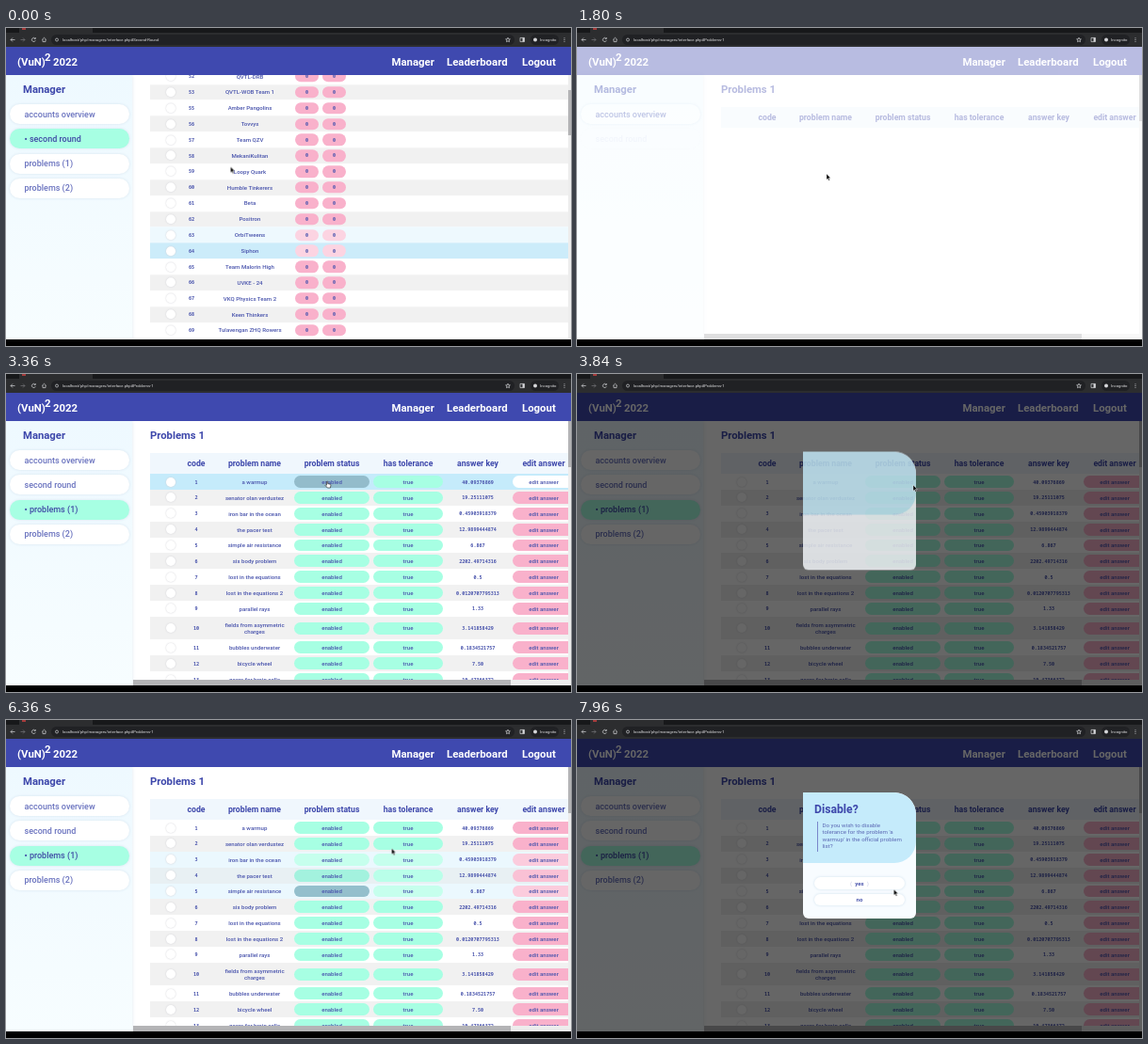
Write an HTML page that moves like this. It is 600 px wide and 338 px high and loops after 8 s.

```html
<!DOCTYPE html>
<html lang="en">
<head>
<meta charset="utf-8">
<title>Contest manager</title>
<style>
  :root { --ink: #3d47ab; --mint: #a7ffe3; --pink: #f9b1cb; --sky: #c5ebfb; }
  html, body { margin: 0; width: 100%; height: 100%; overflow: hidden; background: #000; }
  #stage { position: absolute; left: 0; top: 0; width: 600px; height: 338px; overflow: hidden;
    background: #000; font: 500 6.1px Roboto, sans-serif; color: #4a55ad; }
  #stage div { position: absolute; box-sizing: border-box; white-space: pre; }
  .text { display: flex; align-items: center; }
  .mid { display: flex; align-items: center; justify-content: center; text-align: center; line-height: 1.2; }
  .view { overflow: hidden; }
  .white { background: #fff; }
  .tab { background: #17181a; }
  .bar { background: #2c2d2f; }
  .address { background: #202124; border-radius: 6px; }
  .url { font-size: 4.2px; font-weight: 400; color: #e4e4e6; }
  .nav { background: #3f49af; }
  .link { font-size: 11.4px; font-weight: 700; color: #fff; }
  .title { font-size: 11.3px; font-weight: 700; color: var(--ink); }
  .side { background: linear-gradient(#eef9ff, #f7fdff); box-shadow: 0 0 4px #dfe8f0; }
  .item { border-radius: 11px; background: #fff; box-shadow: 0 0 3px #d5e3ee; padding-left: 15.5px;
    font-size: 9px; color: #6a73bf; }
  .item.on { background: var(--mint); color: #3f4aa5; }
  .head { background: #f0f7fd; }
  .label { font-size: 8.7px; font-weight: 700; color: var(--ink); }
  .num { font: 600 5.1px "Noto Sans Mono", monospace; }
  .pill { border-radius: 7px; }
  .dot { border-radius: 50%; background: #fff; box-shadow: 0 0 2px #cfcfd4; }
  .track { background: #ededed; }
  .thumb { background: #b4b4b6; }
  .dim { background: rgba(0, 0, 0, .6); }
  .modal { background: #f8fcff; border-radius: 1px 23px 6px 6px; overflow: hidden; }
  .top { background: var(--sky); border-radius: 0 23px 23px 0; }
  .ask { font-size: 12.2px; font-weight: 700; color: var(--ink); }
  .body { font-size: 6.2px; font-weight: 400; line-height: 7.3px; color: #5b68b4;
    border-left: 1px solid #7a86cb; padding: 1px 0 0 4.5px; }
  .button { border-radius: 7px; background: #fff; box-shadow: 0 0 3px #cfe0ec; font-weight: 700; }
  .parens { display: flex; align-items: center; justify-content: space-between; font-weight: 700; }
  svg { position: absolute; left: 0; top: 0; overflow: visible; }
</style>
</head>
<body>
<div id="stage"></div>
<script>
const LOOP = 8000;
const stage = document.getElementById('stage');
let css = '', count = 0;

function box(parent, cls, x, y, w, h, text = '') {
  const el = document.createElement('div');
  el.className = cls;
  el.style.cssText = `left:${x}px;top:${y}px;width:${w}px;height:${h}px`;
  el.textContent = text;
  parent.append(el);
  return el;
}
const centred = (parent, cls, x, h, text) => box(parent, 'mid ' + cls, x - 50, 0, 100, h, text);

// Stops are [milliseconds, declarations].
function animate(el, stops, ease = 'linear') {
  const id = 'k' + count++;
  const all = [[0, stops[0][1]], ...stops, [LOOP, stops.at(-1)[1]]];
  css += `@keyframes ${id}{${all.map(([t, s]) => `${t / LOOP * 100}%{${s}}`).join('')}}\n`;
  const rule = `${id} ${LOOP}ms ${ease} infinite`;
  el.style.animation = el.style.animation ? `${el.style.animation}, ${rule}` : rule;
}

function fadeIn(el, on, dur, off, offDur) {
  const stops = [[on, 'opacity:0'], [on + dur, 'opacity:1']];
  if (off) stops.push([off, 'opacity:1'], [off + offDur, 'opacity:0']);
  animate(el, stops);
}

// Spans are [on, off, strength].
function glow(el, base, hot, spans) {
  const stops = [];
  for (const [on, off, k = 1] of spans) {
    const lit = `background-color:color-mix(in srgb, ${hot} ${k * 100}%, ${base})`;
    const rest = `background-color:${base}`;
    stops.push([on, rest], [Math.min(on + 150, off), lit], [off, lit], [off + 250, rest]);
  }
  animate(el, stops);
}

function show(el, spans, first = 0) {
  const stops = [[0, `opacity:${first}`]];
  for (const [on, off] of spans)
    stops.push([on, `opacity:${1 - first}`], [off, `opacity:${first}`]);
  animate(el, stops, 'step-end');
}

function drawing(parent, markup) {
  parent.insertAdjacentHTML('beforeend', `<svg width="1" height="1">${markup}</svg>`);
  return parent.lastElementChild;
}

function browserBar() {
  box(stage, 'tab', 0, 0, 600, 5);
  box(stage, 'bar', 14, 0, 78, 5);
  box(stage, '', 17, 0, 4, 1.5).style.background = '#a33b3b';
  box(stage, 'bar', 0, 4.5, 600, 15.5);
  box(stage, 'address', 48, 7, 492, 11);
  const url = 'localhost/php/managers/interface.php#';
  show(box(stage, 'text url', 60, 7, 200, 11, url + 'Second-Round'), [[600, LOOP]], 1);
  show(box(stage, 'text url', 60, 7, 200, 11, url + 'Problems-1'), [[600, LOOP]]);
  box(stage, 'address', 557, 7, 30, 11);
  box(stage, 'text url', 567, 7, 20, 11, 'Incognito');
  drawing(stage, `<g fill="none" stroke="#d6d7da" stroke-width=".7">
    <path d="M9.5 12.5H5M7 10.5l-2 2 2 2"/><path stroke="#77787b" d="M15.5 12.5H20M18 10.5l2 2-2 2"/>
    <path d="M31 11.3a2 2 0 1 0 .3 1.8M31.3 10v1.5h-1.5"/><path d="M38.3 12.3l2.2-2 2.2 2M39 12v2.6h3V12"/>
    <circle cx="54" cy="12.5" r="1.5"/>
    <path d="M533 10.2l.7 1.6 1.7.1-1.3 1.1.4 1.7-1.5-.9-1.5.9.4-1.7-1.3-1.1 1.7-.1z"/>
    <path d="M546 10.4h4.4v4.2H546z"/></g>
    <path fill="#d6d7da" d="M548.5 10.4h2v4.2h-2z"/><circle cx="562" cy="12.5" r="2" fill="#d6d7da"/>
    <g fill="#d6d7da"><circle cx="593" cy="10.7" r=".5"/><circle cx="593" cy="12.5" r=".5"/><circle cx="593" cy="14.3" r=".5"/></g>`);
}

// Returns the parts so that a page can bring them in one after another.
function frame(page, active) {
  const side = box(page, 'side', 0, 50, 134, 281);
  const nav = box(page, 'nav', 0, 20, 600, 30);
  box(nav, 'text link', 12, 0, 40, 31, '(VuN)');
  box(nav, 'text link', 41, 0, 10, 22, '2');
  box(nav, 'text link', 50, 0, 40, 31, '2022');
  [['Manager', 409.5], ['Leaderboard', 468], ['Logout', 548]]
    .forEach(([s, x]) => box(nav, 'text link', x, 0, 70, 31, s));
  const title = box(page, 'text title', 18, 57, 100, 16, 'Manager');
  const items = ['accounts overview', 'second round', 'problems (1)', 'problems (2)'].map((s, i) =>
    box(page, 'text item' + (i === active ? ' on' : ''), 4, 81 + 26.3 * i, 127, 21,
      i === active ? '• ' + s : s));
  return { parts: [side, nav, title], items };
}

function roundPage() {
  const page = box(stage, 'view white', 0, 0, 600, 331);
  page.style.clipPath = 'inset(20px 0 0 0)';
  animate(page, [[640, 'opacity:1'], [720, 'opacity:0']]);
  const view = box(page, 'view', 135, 50, 462, 281);
  const list = box(view, '', 18, 0, 444, 400);
  animate(list, [[0, 'transform:none'], [280, 'transform:translateY(48px)']], 'ease-out');
  const names = ['Quanta', 'Team Vector', 'Pendulum', 'Torque', 'Fulcrum', 'QVTL-DRB', 'QVTL-WOB Team 1',
    'Amber Pangolins', 'Tovvys', 'Team QZV', 'MekaniKulitan', 'Loopy Quark', 'Humble Tinkerers', 'Beta',
    'Positron', 'OrbiTweens', 'Siphon', 'Team Malorin High', 'UVKE - 24', 'VKQ Physics Team 2',
    'Keen Thinkers', 'Tulavengan ZHQ Rowers', 'Lumen'];
  const pitch = 16.87;
  names.forEach((name, i) => {
    const code = 47 + i + (i > 6);
    const base = i % 2 ? '#ffffff' : '#f1f1f1';
    const heat = { 63: .3, 64: .85 }[code];
    const row = box(list, '', 0, 9.6 + pitch * (i - 6), 444, pitch);
    row.style.background = base;
    box(row, 'dot', 16.5, 3.4, 10, 10);
    centred(row, 'num', 44, pitch, code);
    centred(row, '', 106, pitch, name);
    const pills = [154, 183].map(x => box(row, 'mid pill num', x, 2.2, 25, 12.4, '0'));
    pills.forEach(p => p.style.background = 'var(--pink)');
    if (!heat) return;
    const cool = (el, hot, from, k) => animate(el, [
      [0, `background-color:color-mix(in srgb, ${hot} ${k * 100}%, ${from})`],
      [240, `background-color:${from}`], [LOOP - 1, `background-color:${from}`]]);
    cool(row, 'var(--sky)', base, heat);
    pills.forEach(p => cool(p, 'white', 'var(--pink)', .45));
  });
  box(page, 'track', 597, 50, 3, 281);
  const thumb = box(page, 'thumb', 597, 66, 3, 48);
  animate(thumb, [[0, 'transform:none'], [280, 'transform:translateY(-4px)']], 'ease-out');
  frame(page, 1);
}

function problemsPage() {
  const page = box(stage, 'view', 0, 0, 600, 331);
  const { parts, items } = frame(page, 2);
  const start = 1720;
  const view = box(page, 'view', 135, 50, 462, 281);
  const title = box(view, 'text title', 18, 7, 100, 16, 'Problems 1');
  const head = box(view, 'head', 18, 34, 444, 22);
  [['code', 49], ['problem name', 111], ['problem status', 193], ['has tolerance', 274],
    ['answer key', 348], ['edit answer', 418]].forEach(([s, x]) => centred(head, 'label', x, 22.5, s));

  const problems = [['a warmup', '40.09376869'], ['senator olan verdustez', '19.25111075'],
    ['iron bar in the ocean', '0.45903918379'], ['the pacer test', '12.9899444874'],
    ['simple air resistance', '6.867'], ['six body problem', '2202.49714316'],
    ['lost in the equations', '0.5'], ['lost in the equations 2', '0.0120707795313'],
    ['parallel rays', '1.33'], ['fields from asymmetric\ncharges', '3.141858429'],
    ['bubbles underwater', '0.1834521757'], ['bicycle wheel', '7.50'],
    ['gears for brain cells', '10.47366372']];
  const hovers = { 1: [[3000, 3700], [6440, 6800]], 2: [[2900, 3000], [6370, 6440, .5]],
    3: [[2780, 2900], [6300, 6360, .35]], 4: [[2060, 2780], [6250, 6330, .2]],
    5: [[6100, 6300, .35]], 6: [[5950, 6060, .5]] };
  const touched = { '1,0': [[3100, 3700]], '1,1': [[6500, 6800]],
    '4,0': [[6290, 6330, .2]], '5,0': [[6100, 6340, .95]] };
  const fills = ['var(--mint)', 'var(--mint)', 'var(--pink)'];
  let y = 56.2;
  problems.forEach(([name, answer], i) => {
    const code = i + 1, h = name.includes('\n') ? 24.6 : 16.85;
    const base = i % 2 ? '#f1f1f1' : '#ffffff';
    const row = box(view, '', 18, y, 444, h);
    y += h;
    row.style.background = base;
    box(row, 'dot', 16.5, h / 2 - 5, 10, 10);
    centred(row, 'num', 49, h, code);
    centred(row, '', 111, h, name);
    centred(row, 'num', 348, h, answer);
    [['enabled', 153, 80], ['true', 237, 74], ['edit answer', 385, 66]].forEach(([s, x, w], j) => {
      const pill = box(row, 'mid pill', x, h / 2 - 6.4, w, 12.8, s);
      pill.style.background = fills[j];
      const touch = touched[[code, j]];
      if (touch) glow(pill, fills[j], '#93bccb', touch);
      else if (hovers[code]) glow(pill, fills[j], 'white', hovers[code]);
    });
    fadeIn(row, start + 90 + 75 * i, 200);
    if (hovers[code]) glow(row, base, 'var(--sky)', hovers[code]);
  });

  const bars = [box(page, 'track', 135, 325, 462, 6), box(page, 'thumb', 135, 325, 401, 6),
    box(page, 'track', 597, 50, 3, 281), box(page, 'thumb', 597, 50, 3, 49)];
  [...parts, title, head, ...bars].forEach(el => fadeIn(el, start, 220));
  items.forEach((el, i) => fadeIn(el, start + 70 * i, 200));
}

function dialog(lines, on, off, hover) {
  const extra = lines.length - 3, y = 81 - 4 * extra, blue = 67 + 7.5 * extra;
  const dim = box(stage, 'dim', 0, 20, 600, 311);
  const modal = box(stage, 'modal', 240, y, 120, 126 + 8 * extra);
  box(modal, 'top', 0, 0, 120, blue);
  const parts = [box(modal, 'text ask', 12, 10, 90, 16, 'Disable?'),
    box(modal, 'body', 15, 31, 104, 3 + 7.3 * lines.length, lines.join('\n'))];
  ['yes', 'no'].forEach((s, i) => {
    const button = box(modal, 'mid button', 12, blue + 15.7 + 17.3 * i, 96, 12.6, s);
    const parens = box(button, 'parens', 38, 0, 20, 12.6);
    parens.innerHTML = '<span>(</span><span>)</span>';
    const [from, to] = hover[i];
    glow(button, 'white', i ? '#fbc6d6' : '#d8f7f6', [[from, to]]);
    fadeIn(parens, from, 150, to, 200);
    parts.push(button);
  });
  fadeIn(dim, on, 200, off, 200);
  fadeIn(modal, on + 40, 200, off, 180);
  animate(modal, [[on + 40, 'transform:translateY(10px)'], [on + 280, 'transform:none']], 'ease-out');
  parts.forEach((el, i) => fadeIn(el, on + 240 + 70 * i, 200));
}

function pointer() {
  const cursor = box(stage, '', 0, 0, 1, 1);
  const arrow = drawing(cursor, `<path d="M0 0V6.2L1.4 5l1 2.2 1-.5-1-2.1h1.9z" fill="#000" stroke="#fff" stroke-width=".4"/>`);
  const hand = drawing(cursor, `<path d="M-.5 .4Q.1-.4.7.4V2.6L3.3 3.2Q4 3.4 3.9 4.2L3.4 7H.3L-1.9 4.4Q-1.7 3.5-.5 4.2z" fill="#fff" stroke="#111" stroke-width=".6"/>`);
  const clickable = [[420, 720], [3120, 3700], [4640, 5960], [6490, 6800], [7660, 7900]];
  show(hand, clickable);
  show(arrow, clickable, 1);
  const path = [[0, 238.5, 147.5], [240, 238.5, 147.5], [520, 75, 143], [1000, 76, 145], [1480, 80, 147],
    [1800, 265, 155], [2600, 285.5, 157.5], [2760, 287, 156], [3120, 338, 114], [3640, 345, 114],
    [3840, 357, 118], [4200, 356, 122], [4700, 318, 170], [5000, 319, 171], [5240, 329, 191],
    [5360, 329, 192], [5980, 329, 192], [6360, 409.5, 136.5], [6540, 428, 114], [7260, 426, 116],
    [7720, 330, 172], [7800, 331, 173], [7960, 336.5, 180]];
  animate(cursor, path.map(([t, x, y]) => [t, `transform:translate(${x}px,${y}px)`]), 'ease-in-out');
}

box(stage, 'white', 0, 20, 600, 311);
browserBar();
problemsPage();
roundPage();
dialog(['Do you wish to disable the', "problem 'a warmup' from the", 'official problem list?'],
  3640, 5880, [[4640, 5100], [5160, 5900]]);
dialog(['Do you wish to disable', "tolerance for the problem 'a", "warmup' in the official problem", 'list?'],
  6760, 0, [[7640, 7840], [7970, 7990]]);
pointer();

const sheet = document.createElement('style');
sheet.textContent = css;
document.head.append(sheet);
</script>
</body>
</html>
```
